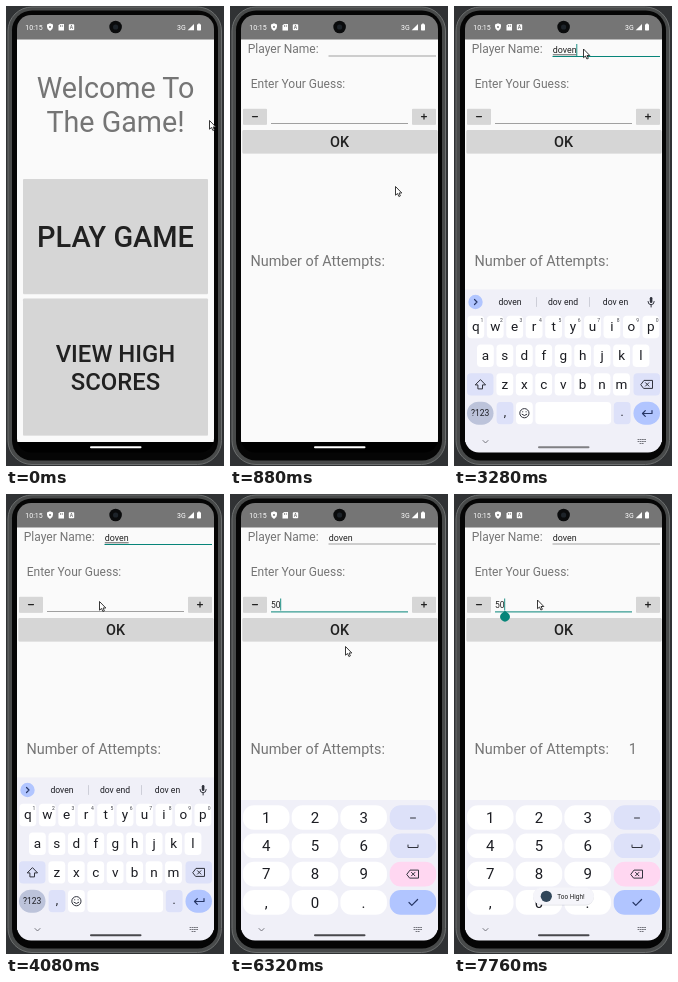
These frames come from a looping animation (218 px wide and 460 px high, 8 s). An HTML page:

```html
<!DOCTYPE html>
<html lang="en">
<head>
<meta charset="utf-8">
<title>Guessing game</title>
<style>
html, body { margin: 0; width: 100%; height: 100%; overflow: hidden; background: #303234; }
svg { display: block; width: 218px; height: 460px; font-family: Roboto, sans-serif; }
</style>
</head>
<body>
<svg id="stage" viewBox="0 0 218 460" xmlns="http://www.w3.org/2000/svg"></svg>
<script>
const rect = (x, y, w, h, fill, r = 0, extra = '') =>
  `<rect x="${x}" y="${y}" width="${w}" height="${h}" rx="${r}" fill="${fill}" ${extra}/>`;
const text = (s, x, y, size, fill = '#757575', anchor = 'start', extra = '') =>
  `<text x="${x}" y="${y}" font-size="${size}" fill="${fill}" text-anchor="${anchor}" ${extra}>${s}</text>`;
const line = (d, color = '#30323c', w = 1, extra = '') =>
  `<path d="${d}" fill="none" stroke="${color}" stroke-width="${w}" stroke-linecap="round" stroke-linejoin="round" ${extra}/>`;
const group = (id, body, extra = '') => `<g id="${id}" ${extra}>${body}</g>`;
const mid = (s, x, y, size, fill, extra) => text(s, x, y, size, fill, 'middle', extra);

const INK = '#212121', TEAL = '#078579', GREY = '#d6d6d6';
const LILAC = '#dde1f9', BLUE = '#b1c5ff', PAD = '#f0f0f8', KEYINK = '#1b1c22';
const MEDIUM = 'font-weight="500"';

function button(x, y, w, h) {
  return rect(x, y + .8, w, h, '#000', 1, 'opacity=".13"') + rect(x, y, w, h, GREY, 1);
}

function statusBar() {
  return rect(11, 9, 197, 24.5, '#757575') +
    text('10:15', 19.3, 23.8, 7, '#fff') +
    '<path d="M44 17.3l3 1.2v2.2q0 2.8-3 4.2q-3-1.4-3-4.2v-2.2z" fill="#fff"/>' +
    '<circle cx="44" cy="21" r="1" fill="#757575"/>' +
    '<path d="M54 18h4v6.5h-5.5v-5z" fill="#fff"/>' +
    line('M54.5 19.3v1.3M56.3 19.3v1.3', '#757575', .7) +
    rect(62.8, 18.3, 5.4, 6, '#fff', .8) +
    mid('A', 65.5, 23.2, 5, '#757575', 'font-weight="700"') +
    text('3G', 171, 23.6, 7, '#fff') +
    '<path d="M188 18v6.3h-6.3z" fill="#fff"/>' +
    rect(191, 18.3, 4, 6.2, '#fff', .7) + rect(192.2, 17.5, 1.6, 1.5, '#fff') +
    '<circle cx="109.6" cy="21" r="6.3" fill="#0a0b0c"/>' +
    '<circle cx="109.6" cy="21" r="2.6" fill="#1d2329"/>';
}

function homePage() {
  return rect(11, 33, 197, 403, '#fafafa') +
    mid('Welcome To', 109.5, 92.4, 28.7, '#757575') +
    mid('The Game!', 109.5, 126.2, 28.7, '#757575') +
    button(17, 173, 185, 114.5) +
    rect(17, 173, 185, 114.5, '#000', 1, 'id="playPress" opacity="0"') +
    mid('PLAY GAME', 109.5, 241, 28.9, INK, MEDIUM) +
    button(17, 292.5, 185, 136.5) +
    mid('VIEW HIGH', 109.5, 356, 23.9, INK, MEDIUM) +
    mid('SCORES', 109.5, 384, 23.9, INK, MEDIUM);
}

function gamePage() {
  return rect(11, 33, 197, 403, '#fafafa') +
    text('Player Name:', 17.8, 47.2, 12) +
    rect(98.5, 49.6, 107.5, .8, '#8a8a8a', 0, 'id="nameLine"') +
    text('', 98.8, 47.2, 8.9, INK, 'start', 'id="nameText"') +
    rect(98.8, 48.5, 24.5, .7, INK, 0, 'id="compose"') +
    text('Enter Your Guess:', 20.7, 82.2, 12) +
    button(13, 102.8, 24, 15.5) + line('M22.5 110.6h5', INK, 1.2) +
    button(182, 102.8, 24, 15.5) + line('M191.5 110.6h5M194 108.1v5', INK, 1.2) +
    rect(41, 117, 137, .8, '#8a8a8a', 0, 'id="guessLine"') +
    text('', 41, 113.9, 8.5, INK, 'start', 'id="guessText"') +
    button(12.5, 124, 195, 23) +
    rect(12.5, 124, 195, 23, 'url(#ripple)', 1, 'id="okPress" opacity="0"') +
    mid('OK', 109.5, 141.3, 14.4, INK, MEDIUM) +
    text('Number of Attempts:', 20.5, 259.5, 14.4) +
    text('1', 174.8, 259.5, 14.4, '#757575', 'start', 'id="tries"') +
    rect(0, 0, .9, 12, TEAL, 0, 'id="caret"') +
    group('handle', `<path d="M51 116.8L55 120A4.8 4.8 0 1 1 47 120Z" fill="${TEAL}"/>`);
}

const backspace = (x, y) =>
  line(`M${x - 6} ${y}l3-4h8.5v8h-8.5zM${x - 1.5} ${y - 1.7}l3.4 3.4m0-3.4l-3.4 3.4`);

function keyRow(letters, x, y, hints = '') {
  return [...letters].map((c, i) => {
    const cx = x + i * 19.45;
    return rect(cx - 8.4, y - 11.2, 16.8, 22.4, '#fff', 4) +
      mid(c, cx, y + 4.4, 13.5, KEYINK) +
      (hints ? mid(hints[i], cx + 6.2, y - 4.8, 5, '#44464f') : '');
  }).join('');
}

function toolbar() {
  const box = (x, w, h) => line(`M${x - w} ${298.5 - h}h${2 * w}v${2 * h}h${-2 * w}z`);
  return line('M22.5 296l-2.5 2.5l2.5 2.5', '#273766', 1.2) +
    box(50, 4, 4) + line('M48 299.5q2 2.5 4 0M48.5 297v.2M51.5 297v.2') +
    mid('GIF', 77.5, 301.5, 8, '#30323c', 'font-weight="700"') +
    box(106, 3.5, 4.2) + line('M104.5 294h3M104.5 298h3M104.5 300.5h3') +
    box(134, 4.2, 3.6) + line('M132 298h1.5M135 298h1M132 303.5h4') +
    line('M152 294v9', '#c4c6d0', .8) +
    [165.5, 169, 172.5].map(x => `<circle cx="${x}" cy="298.5" r="1.1" fill="#30323c"/>`).join('');
}

function letterKeys() {
  return `<circle cx="21.5" cy="298.5" r="7.2" fill="${BLUE}"/>` +
    group('tools', toolbar()) +
    group('words', line('M20.5 296l2.5 2.5l-2.5 2.5', '#273766', 1.2) +
      [56, 109, 161.5].map((x, i) => mid('', x, 301.5, 8.6, KEYINK, `id="word${i}"`)).join('') +
      line('M82.5 294v9M135.5 294v9', '#c4c6d0', .8)) +
    rect(195.8, 293.5, 2.6, 6, '#30323c', 1.3) +
    line('M194 298q0 3.2 3.1 3.2t3.1-3.2M197.1 301.5v2') +
    keyRow('qwertyuiop', 21.8, 323.5, '1234567890') +
    keyRow('asdfghjkl', 31.4, 352.2) +
    keyRow('zxcvbnm', 50.8, 380.9) +
    rect(13, 369.7, 26.5, 22.4, LILAC, 4) +
    line('M26.2 376.4l-5 5h2.7v4h4.6v-4h2.7z') +
    rect(179.5, 369.7, 26.5, 22.4, LILAC, 4) + backspace(193, 380.9) +
    rect(13, 398.2, 26.5, 23, '#bcc3da', 11.5) + mid('?123', 26.2, 412.7, 8.5, KEYINK) +
    rect(42.6, 398.4, 16.8, 22.4, LILAC, 4) + mid(',', 51, 412.2, 12, KEYINK) +
    rect(62, 398.4, 16.8, 22.4, '#fff', 4) +
    '<circle cx="70.4" cy="409.7" r="4.6" fill="none" stroke="#30323c"/>' +
    line('M68.7 408.2v.2M72.1 408.2v.2M68 410.9q2.4 2.5 4.8 0') +
    rect(81.4, 398.4, 75.7, 22.4, '#fff', 4) +
    rect(159.8, 398.4, 16.8, 22.4, LILAC, 4) + mid('.', 168.2, 412.2, 12, KEYINK) +
    rect(179.5, 398.2, 26.5, 23, BLUE, 11.5) +
    line('M198 407v3h-9.5m2.8-2.8l-2.8 2.8l2.8 2.8', '#273766', 1.2);
}

function numberKeys() {
  const rows = ['123', '456', '789', ',0.'];
  const side = [LILAC, LILAC, '#ffd7f1', BLUE];
  return rows.map((row, r) => {
    const y = 323.5 + r * 28.3;
    return [...row].map((c, i) => rect(13 + i * 48.7, y - 12.3, 46.5, 24.6, '#fff', 11) +
      mid(c, 36.2 + i * 48.7, y + 5.3, 15, KEYINK)).join('') +
      rect(159.7, y - 12.3, 46.5, 24.6, side[r], 11);
  }).join('') +
    line('M180.5 324h5') + line('M178 351v2.5h10v-2.5') + backspace(183, 380.1) +
    line('M179 408.5l2.8 2.8l5.8-5.8', '#273766', 1.2);
}

function navIcons() {
  return line('M29 437l2.5 2.5l2.5-2.5', '#74757d') +
    line('M184 436h8M184 438h8M186 440h4', '#74757d', 1, 'stroke-dasharray="1 1.2"');
}

function toast() {
  return rect(79, 394, 61, 17.5, '#3c4260', 8.7, 'opacity=".16"') +
    rect(79, 393.5, 61, 17.3, '#f5f5fa', 8.6) +
    '<circle cx="92.3" cy="402.3" r="5.6" fill="#31475a"/>' +
    text('Too High!', 103.3, 404.7, 6.4, INK);
}

const stage = document.getElementById('stage');
stage.innerHTML =
  '<defs><clipPath id="glass"><rect x="11" y="9" width="197" height="437.5" rx="14"/></clipPath>' +
  '<linearGradient id="ripple"><stop offset="0" stop-color="#b9b9b9"/><stop offset=".8" stop-color="#b9b9b9"/>' +
  '<stop offset="1" stop-color="#cecece"/></linearGradient></defs>' +
  rect(0, 0, 218, 460, '#303234') +
  rect(2, 1, 213.5, 457.5, '#484a4a', 24, 'stroke="#6c6f6f"') +
  rect(6, 4.5, 206, 450, '#050505', 20) +
  group('screen',
    rect(11, 9, 197, 438, '#000') +
    group('home', homePage()) + group('game', gamePage()) + statusBar() +
    group('keyboard', rect(11, 286, 197, 170, PAD, 0, 'id="pad"') +
      group('letters', letterKeys()) + navIcons()) +
    group('numbers', numberKeys()) +
    rect(84, 440.2, 51.5, 2, '#fff', 1, 'id="pill"') +
    group('toast', toast()), 'clip-path="url(#glass)"') +
  group('pointer', '<path d="M.5.5V9.2L2.5 7.5L3.9 10.5L5.4 9.8L4 7H6.8Z" fill="#fff" stroke="#222" stroke-width=".9" stroke-linejoin="round"/>');

const el = {};
stage.querySelectorAll('[id]').forEach(n => el[n.id] = n);

// Rows of [time, value...]
const pointerPath = [
  [0, 203, 114], [560, 165, 180], [880, 165, 180], [1440, 129, 42.5], [3680, 129, 42.5],
  [4080, 93, 107], [4960, 93, 107], [5040, 90, 131.5], [5360, 96, 147], [6240, 96, 147],
  [6320, 115, 152], [6480, 115, 152], [6640, 111, 138], [6960, 111, 138],
  [7280, 90, 112], [7600, 83, 105.5]
];
const toastFade = [[6720, 0], [6800, .25], [6960, .7], [7200, 1]];
const okFade = [[6880, 0], [6960, 1], [7040, 1], [7200, 0]];
const pillTone = [[1840, 238], [2560, 215], [3280, 128], [3440, 72]];
const keyboardRise = [[1760, 70], [1840, 0], [2320, -2.5]];
const typing = [
  [0, '', '', '', ''],
  [2560, 'd', 'd', 'do', 'did'],
  [2720, 'do', 'do', 'don’t', 'dog'],
  [2960, 'dov', 'dov', 'dove', 'do v'],
  [3040, 'dove', 'dove', 'doves', 'do ve'],
  [3280, 'doven', 'doven', 'dov end', 'dov en']
];
const guesses = [[0, ''], [6000, '5'], [6320, '50']];

function step(table, t) {
  return table.filter(r => r[0] <= t).pop() || table[0];
}
function tween(table, t) {
  const i = table.findIndex(r => r[0] > t);
  if (i < 0) return table[table.length - 1].slice(1);
  if (i === 0) return table[0].slice(1);
  const [a, b] = [table[i - 1], table[i]], k = (t - a[0]) / (b[0] - a[0]);
  return a.slice(1).map((v, j) => v + (b[j + 1] - v) * k);
}
const set = (id, attrs) => { for (const k in attrs) el[id].setAttribute(k, attrs[k]); };
const show = (id, on) => set(id, { opacity: +on });
const put = (id, s) => { if (el[id].textContent !== s) el[id].textContent = s; };
const between = (t, a, b) => t >= a && t < b;

function field(id, y, focus) {
  set(id, { fill: focus ? TEAL : '#8a8a8a', height: focus ? 1 : .8, y: focus ? y + .4 : y });
}

function render(ms) {
  const t = Math.floor(ms / 80) * 80;
  const onName = between(t, 1760, 4240), onGuess = t >= 4240;

  show('playPress', between(t, 720, 880) ? .12 : 0);
  show('game', t < 800 ? 0 : t < 880 ? .6 : 1);
  field('nameLine', 49.6, onName);
  field('guessLine', 117, onGuess);

  const [, name, ...words] = step(typing, t);
  put('nameText', name);
  words.forEach((w, i) => put('word' + i, w));
  const nameWidth = el.nameText.getComputedTextLength();
  set('compose', { width: nameWidth });
  show('compose', onName && name !== '');
  show('tools', name === '');
  show('words', name !== '');

  put('guessText', step(guesses, t)[1]);
  const nameCaret = between(t, 1760, 2320) || between(t, 2560, 3760);
  const guessCaret = between(t, 5120, 6800) || t >= 7760;
  show('caret', nameCaret || guessCaret);
  set('caret', onName
    ? { x: 98.5 + nameWidth, y: 38 }
    : { x: 40.7 + el.guessText.getComputedTextLength(), y: 104.5 });
  show('handle', t >= 7760);
  show('tries', t >= 6800);
  show('okPress', tween(okFade, t)[0]);

  show('keyboard', t >= 1760);
  set('keyboard', { transform: `translate(0 ${tween(keyboardRise, t)[0]})` });
  const swap = t < 4240 ? 0 : t < 4320 ? .5 : 1;
  show('letters', 1 - swap);
  show('numbers', swap);
  set('pad', { y: 286 + 22.5 * swap });

  const tone = Math.round(tween(pillTone, t)[0]);
  set('pill', { fill: t < 1840 ? '#fff' : `rgb(${tone},${tone},${tone + 4})` });
  show('toast', tween(toastFade, t)[0]);
  set('pointer', { transform: `translate(${tween(pointerPath, t).join(' ')})` });
}

const start = performance.now();
function tick() {
  render((performance.now() - start) % 8000);
  requestAnimationFrame(tick);
}
tick();
</script>
</body>
</html>
```
